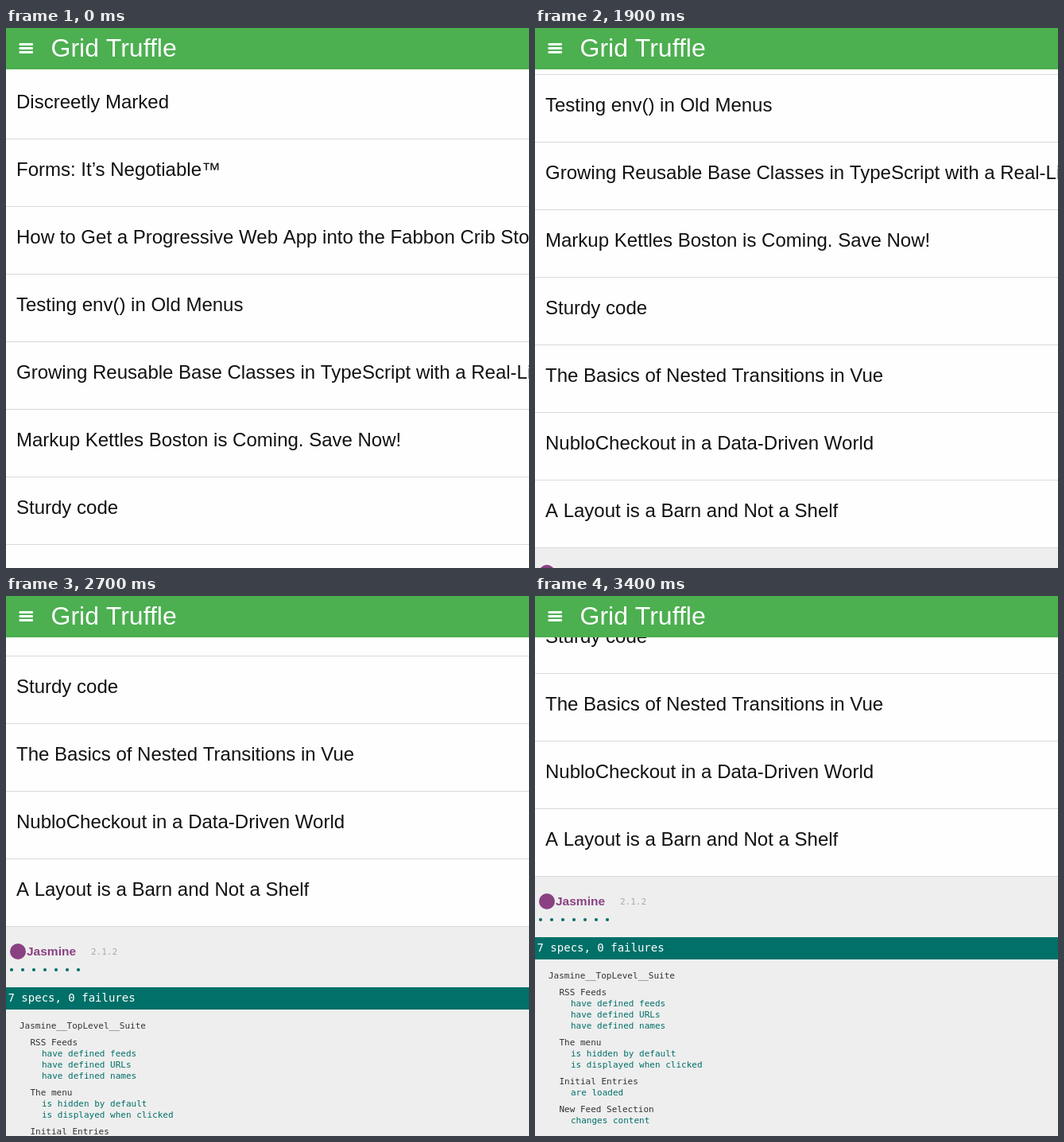
Write an HTML page with a canvas that moves like this. It is 658 px wide and 679 px high and loops after 5.1 s.

```html
<!DOCTYPE html>
<html lang="en">
<head>
<meta charset="utf-8">
<title>Feed reader</title>
<style>
  html, body { margin: 0; width: 100%; height: 100%; overflow: hidden; background: #fefefe; }
  canvas { display: block; width: 658px; height: 679px; }
</style>
</head>
<body>
<canvas id="stage" width="658" height="679"></canvas>
<script>
const W = 658, H = 679, LOOP = 5100;
const ctx = document.getElementById('stage').getContext('2d');

const SANS = '"Liberation Sans", Arial, sans-serif';
const MONO = '"DejaVu Sans Mono", monospace';
const TEAL = '#007069';
const HEADER = 52, ROW = 85, FIRST_LINE = 139;

const entries = [
  'Discreetly Marked',
  'Forms: It’s Negotiable™',
  'How to Get a Progressive Web App into the Fabbon Crib Store',
  'Testing env() in Old Menus',
  'Growing Reusable Base Classes in TypeScript with a Real-Life Demo',
  'Markup Kettles Boston is Coming. Save Now!',
  'Sturdy code',
  'The Basics of Nested Transitions in Vue',
  'NubloCheckout in a Data-Driven World',
  'A Layout is a Barn and Not a Shelf'
];

const suites = [
  ['RSS Feeds', 'have defined feeds', 'have defined URLs', 'have defined names'],
  ['The menu', 'is hidden by default', 'is displayed when clicked'],
  ['Initial Entries', 'are loaded'],
  ['New Feed Selection', 'changes content']
];

// Wheel notches of 167 px, clamped at the page end: [start ms, scroll px]
const scrolls = [
  [0, 0], [900, 69], [1000, 167], [1900, 251], [2000, 334],
  [2600, 360], [2700, 489], [2800, 501], [3300, 527], [3400, 552]
];

function scrollAt(t) {
  let y = 0;
  for (const [start, pos] of scrolls) if (t >= start) y = pos;
  return y;
}

function rect(x, y, w, h, color) {
  ctx.fillStyle = color;
  ctx.fillRect(x, y, w, h);
}

function dot(x, y, r, color) {
  ctx.fillStyle = color;
  ctx.beginPath();
  ctx.arc(x, y, r, 0, Math.PI * 2);
  ctx.fill();
}

function text(str, x, y, font, color) {
  ctx.font = font;
  ctx.fillStyle = color;
  ctx.fillText(str, x, y);
}

function drawEntries(scroll) {
  entries.forEach((title, i) => {
    const line = FIRST_LINE + i * ROW - scroll;
    text(title, 13, line - 38, '24px ' + SANS, '#111');
    rect(0, line, W, 1, '#d9d9d9');
  });
}

function drawReport(top) {
  const small = '11px ' + MONO;
  rect(0, top + 1, W, H, '#eee');
  dot(15, top + 32, 10, '#8a4182');
  text('Jasmine', 26, top + 37, 'bold 15.5px ' + SANS, '#8a4182');
  text('2.1.2', 107, top + 36, small, '#aaa');
  for (let i = 0; i < 7; i++) dot(7 + i * 14, top + 55, 2.1, TEAL);

  rect(0, top + 77, W, 28, TEAL);
  text('7 specs, 0 failures', 2.5, top + 95, '14px ' + MONO, '#fff');

  let y = top + 129;
  text('Jasmine__TopLevel__Suite', 17, y, small, '#333');
  for (const [name, ...specs] of suites) {
    y += 21;
    text(name, 30.5, y, small, '#333');
    for (const spec of specs) text(spec, 45, y += 14, small, TEAL);
  }
}

function drawHeader() {
  rect(0, 0, W, HEADER, '#4caf50');
  ctx.fillStyle = '#fff';
  ctx.beginPath();
  for (let i = 0; i < 3; i++) ctx.roundRect(16.5, 19 + i * 5, 17.5, 3, 1);
  ctx.fill();
  text('Grid Truffle', 56.5, 36, '32px ' + SANS, '#fff');
}

function draw(t) {
  const scroll = scrollAt(t);
  rect(0, 0, W, H, '#fefefe');
  drawEntries(scroll);
  drawReport(FIRST_LINE + (entries.length - 1) * ROW - scroll);
  drawHeader();
}

const begin = performance.now();
function tick() {
  draw((performance.now() - begin) % LOOP);
  requestAnimationFrame(tick);
}
tick();
</script>
</body>
</html>
```
